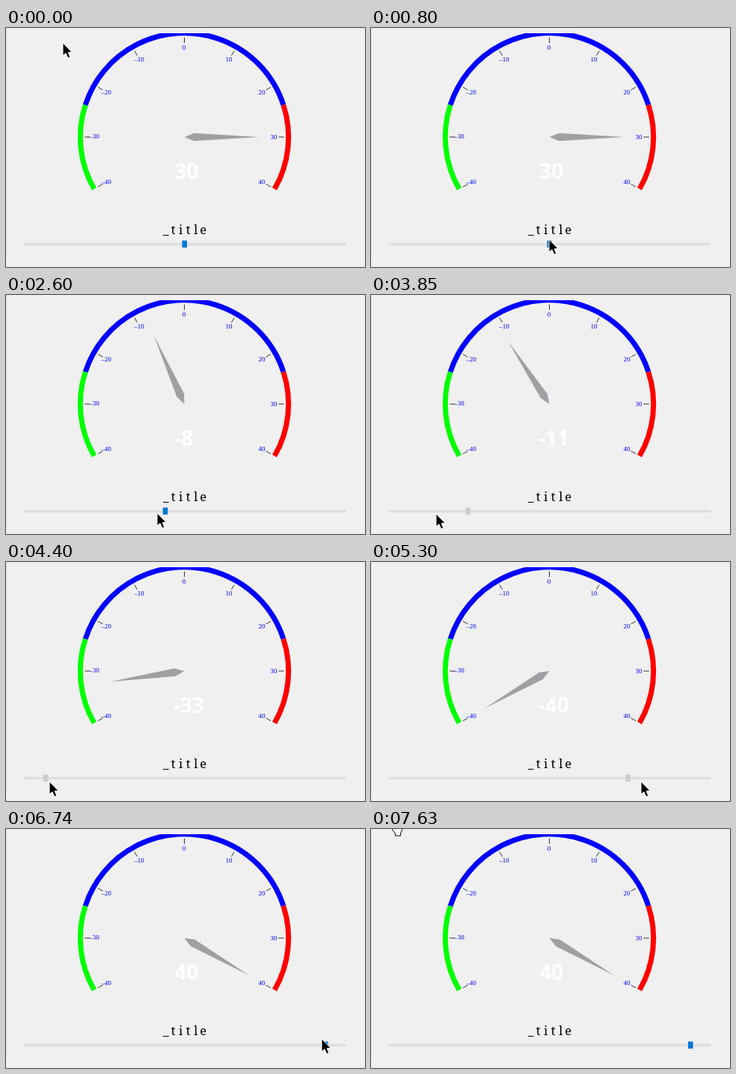
Recreate the animation shown at these times as an HTML page with a canvas. Size 480x320 px, loop 7.72 s.

```html
<!DOCTYPE html>
<html lang="en">
<head>
<meta charset="utf-8">
<title>Gauge</title>
<style>
  html, body { margin: 0; width: 100%; height: 100%; overflow: hidden; background: #f0f0f0; }
  canvas { display: block; }
</style>
</head>
<body>
<canvas id="stage" width="480" height="320"></canvas>
<script>
const ctx = document.getElementById('stage').getContext('2d');
const LOOP = 7720, TICKS = 86, STEP = LOOP / TICKS;
const CX = 238.5, CY = 146;

// All times are in ticks of STEP ms.
const pointerStart = { x: 76, y: 20 };
const glides = [
  { from: 0, to: 4, x: 337, y: 62 },
  { from: 4, to: 9, x: 238, y: 283 },
  { from: 11, to: 17.9, x: 74, y: 283 },
  { from: 18, to: 25.5, x: 230, y: 292 },
  { from: 28, to: 32, x: 52, y: 293 },
  { from: 32, to: 37, x: 228, y: 292 },
  { from: 40, to: 44.6, x: 33, y: 293 },
  { from: 45, to: 51, x: 67, y: 294 },
  { from: 55, to: 60.5, x: 427, y: 294 },
  { from: 74, to: 81, x: 337, y: 62 },
  { from: 81, to: 85, x: 27, y: 0 },
];
const drags = [
  { from: 11, to: 28, lag: 2.47 },
  { from: 28, to: 37, lag: 0.23 },
  { from: 40, to: 54, lag: 0.68 },
  { from: 55, to: 73, lag: 0.22 },
];
const swings = [
  { from: 11, target: -4, rate: 6 },
  { from: 28, target: -12, rate: 4 },
  { from: 33, target: -5, rate: 4 },
  { from: 41.3, target: -40, rate: 3.6 },
  { from: 60.77, target: 40, rate: 6.2 },
];

const clamp = (v, lo, hi) => Math.min(hi, Math.max(lo, v));
const smooth = p => p * p * (3 - 2 * p);

function pointerAt(t) {
  let { x, y } = pointerStart;
  for (const g of glides) {
    const p = smooth(clamp((t - g.from) / (g.to - g.from), 0, 1));
    x += (g.x - x) * p;
    y += (g.y - y) * p;
  }
  return { x, y };
}

// The handle trails the pointer while it is dragged and fades to grey shortly after the grab.
function handleAt(t) {
  const drag = drags.filter(d => d.from <= t).pop();
  if (!drag) return { x: CX, grey: false };
  const { from, to, lag } = drag;
  return {
    x: pointerAt(clamp(t - lag, from, to)).x,
    grey: t > from + lag + 1.6 && t < to,
  };
}

function needleAt(t) {
  return swings.reduce((value, s) => {
    const reach = s.rate * Math.max(0, t - s.from);
    return value + clamp(s.target - value, -reach, reach);
  }, 30);
}

// Gauge value to canvas angle: 3 degrees per unit, zero points up.
const angle = value => (value * 3 - 90) * Math.PI / 180;
const polar = (r, a) => [CX + r * Math.cos(a), CY + r * Math.sin(a)];

function polygon(points) {
  ctx.beginPath();
  points.forEach(([x, y]) => ctx.lineTo(x, y));
  ctx.closePath();
}

function text(str, x, y, font, color, align = 'center') {
  ctx.font = font;
  ctx.fillStyle = color;
  ctx.textAlign = align;
  ctx.fillText(str, x, y);
}

function drawDial() {
  ctx.save();
  ctx.beginPath();
  ctx.rect(0, 7, 480, 313);
  ctx.clip();
  ctx.lineWidth = 7;
  for (const [from, to, color] of [[-40, -24, '#0f0'], [-24, 24, '#00f'], [24, 40, '#f00']]) {
    ctx.beginPath();
    ctx.arc(CX, CY, 139.2, angle(from), angle(to));
    ctx.strokeStyle = color;
    ctx.stroke();
  }
  ctx.restore();
  ctx.lineWidth = 1;
  ctx.strokeStyle = '#333';
  for (let v = -40; v <= 40; v += 10) {
    const a = angle(v);
    ctx.beginPath();
    ctx.moveTo(...polar(126, a));
    ctx.lineTo(...polar(133.3, a));
    ctx.stroke();
    const [x, y] = polar(120, a);
    const label = String(v).replace('-', '\u2013');
    text(label, x - 0.5, Math.floor(y + 3), '9px "Liberation Serif", serif', '#00f');
  }
}

function drawNeedle(value) {
  ctx.save();
  ctx.translate(CX, CY);
  ctx.rotate(angle(value) );
  polygon([[0, 0], [13, -5.3], [100, 0], [13, 5.3]]);
  ctx.fillStyle = '#a0a0a4';
  ctx.fill();
  ctx.restore();
  const label = String(Math.round(value));
  text(label, 228.3 - 1.5 * label.length, 202, 'bold 28px "Open Sans", sans-serif', '#fff', 'left');
}

function drawTitle() {
  [...'_title'].forEach((ch, i) =>
    text(ch, 213.7 + i * 10, 276, '16.5px "Noto Serif", serif', '#000'));
}

function drawSlider({ x, grey }) {
  ctx.fillStyle = '#d6d6d6';
  ctx.fillRect(24, 288, 430, 3);
  ctx.fillStyle = '#e7eaea';
  ctx.fillRect(25, 289, 428, 1);
  ctx.fillStyle = grey ? '#ccc' : '#0078d7';
  ctx.fillRect(x - 3, 284.6, 6.5, 9.4);
}

function drawPointer({ x, y }, isHand) {
  ctx.save();
  ctx.translate(Math.round(x), Math.round(y));
  ctx.lineWidth = 1;
  if (isHand) {
    polygon([[1, -4], [1.5, 1], [5.5, 6], [5.5, 9], [12.5, 9], [12.5, 6], [14.5, 1], [14.5, -4]]);
  } else {
    polygon([[0, 0], [0, 17], [4, 13.8], [6.8, 20.3], [9.8, 19], [7.2, 12.8], [12, 12.3]]);
  }
  ctx.fillStyle = isHand ? '#fff' : '#000';
  ctx.strokeStyle = isHand ? '#000' : '#fff';
  ctx.fill();
  ctx.stroke();
  ctx.restore();
}

function render(now) {
  const tick = Math.min(TICKS - 1, Math.floor((now % LOOP + 12) / STEP));
  ctx.fillStyle = '#f0f0f0';
  ctx.fillRect(0, 0, 480, 320);
  ctx.fillStyle = '#e4e4e4';
  ctx.fillRect(0, 0, 1, 312);
  drawDial();
  drawNeedle(needleAt(tick));
  drawTitle();
  drawSlider(handleAt(tick));
  drawPointer(pointerAt(tick), tick >= 84);
}

const start = performance.now();
function frame() {
  render(performance.now() - start);
  requestAnimationFrame(frame);
}
frame();
</script>
</body>
</html>
```
